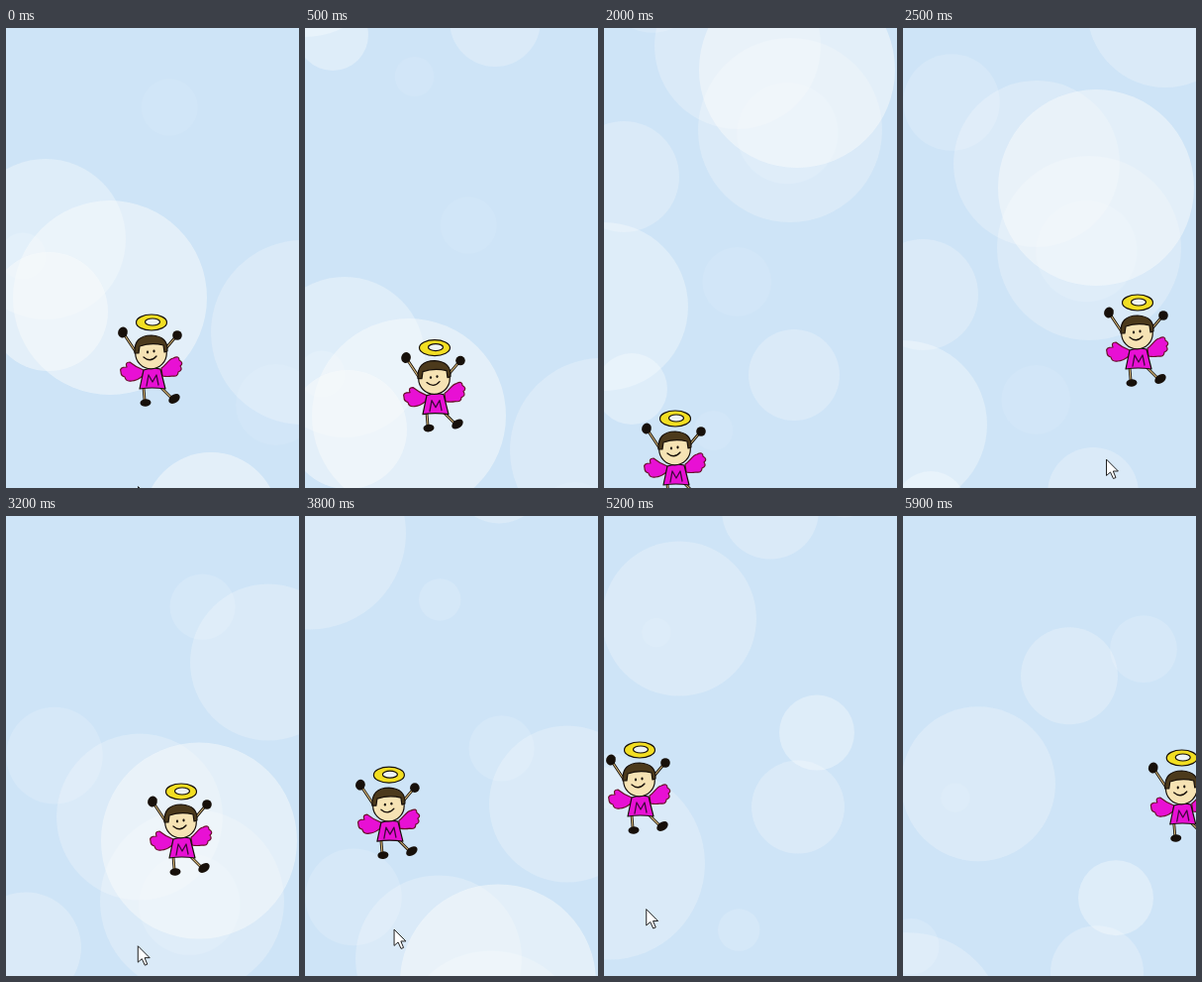
An HTML page with a canvas that plays this animation: 296x464 px, repeating every 6 s.

```html
<!DOCTYPE html>
<html lang="en">
<head>
<meta charset="utf-8">
<title>Flying angel</title>
<style>
  html, body { margin: 0; width: 100%; height: 100%; overflow: hidden; background: #cee4f7; }
  canvas { display: block; }
</style>
</head>
<body>
<canvas id="stage" width="296" height="464"></canvas>
<script>
const ctx = document.getElementById('stage').getContext('2d');
const LOOP = 6000, STEP = 100, SCROLL = 0.238, LEAD = 100;
const INK = '#17100a', PINK = '#e810d4', SKIN = '#f6e3b4', HAIR = '#4c3a1c';

const random = n => Math.abs(Math.sin(n * 12.9898) * 43758.5453) % 1;

// Faint bubbles are scattered evenly up the sky, the large ones placed as x, y, radius
const faint = Array.from({ length: 12 }, (_, i) => ({
  x: 296 * random(i + 1), y: 380 - 150 * i, r: 12 + 40 * random(i + 31), alpha: .06 + .12 * random(i + 61)
}));
const layer = (alpha, ...places) => places.map(([x, y, r]) => ({ x, y, r, alpha }));
const bubbles = [
  ...faint,
  ...layer(.26, [300, 307, 93], [192, -126, 46], [188, -373, 93], [135, -458, 84], [20, -326, 56],
    [265, -614, 79], [5, -887, 97], [196, -944, 47], [76, -1134, 78], [168, -1243, 49]),
  ...layer(.36, [40, 213, 81], [0, -195, 85], [28, -112, 36], [215, -1019, 38]),
  ...layer(.5, [105, 272, 98], [43, 286, 60], [207, 496, 68], [195, -434, 99])
];

// Turning points of the flight: time, x, y
const flight = [
  [0, 147, 297], [400, 125, 325], [1100, 167, 308], [2000, 72, 394], [2500, 237, 277], [2700, 190, 276],
  [3200, 177, 278], [3550, 52, 268], [4500, 177, 242], [5200, 36, 236], [5600, 95, 244], [6000, 344, 244]
];

function flightAt(t) {
  const next = Math.max(1, flight.findIndex(([time]) => time >= t));
  const [t0, x0, y0] = flight[next - 1], [t1, x1, y1] = flight[next];
  const u = (t - t0) / (t1 - t0);
  return [x0 + (x1 - x0) * u, y0 + (y1 - y0) * u];
}

function paint(path, fill, stroke, width = 1.2) {
  if (fill) { ctx.fillStyle = fill; ctx.fill(path, 'evenodd'); }
  if (stroke) { ctx.strokeStyle = stroke; ctx.lineWidth = width; ctx.stroke(path); }
}

function oval(x, y, rx, ry = rx, turn = 0) {
  const path = new Path2D();
  path.ellipse(x, y, rx, ry, turn, 0, 2 * Math.PI);
  return path;
}

function limb(d) {
  paint(new Path2D(d), null, INK, 2.8);
  paint(new Path2D(d), null, '#d8b878', 1.1);
}

const shapes = {
  leftWing: new Path2D('M-8 48Q-16 45-22 40Q-27 40-25 45Q-33 45-31 50Q-31 54-27 55Q-26 60-20 59Q-15 59-9 54Z'),
  rightWing: new Path2D('M10 46C15 43 17 37 22 36Q28 33 28 38Q33 41 29 44Q32 48 27 50Q27 55 21 54Q16 55 11 54Z'),
  dress: new Path2D('M-8 48Q0 45 9 47L14 67Q0 65-12 67Z'),
  letter: new Path2D('M-5 64L-3 53L1 60L5 53L7 63'),
  hair: new Path2D('M-17 31Q-18 13 0 13Q17 14 16 29L13 30L12 23Q0 20-12 24L-13 31Z'),
  smile: new Path2D('M-8 35Q-1 41 5 34'),
  cursor: new Path2D('M0 0V16L4 12.5L7 19L9.5 18L6.8 11.5H11.5Z')
};

function drawAngel() {
  const hole = oval(1, -.5, 7.5, 3.5);
  const halo = oval(0, 0, 15.5, 8);
  halo.addPath(hole);
  paint(hole, '#eef4f4');
  paint(halo, '#f2de22', INK);
  limb('M-27 13L-15 31');
  limb('M24 15L13 28');
  limb('M-8 66L-7 78');
  limb('M10 66L20 76');
  paint(oval(-29, 10, 4.8, 5.5, .3), INK);
  paint(oval(26, 13, 4.8), INK);
  paint(oval(-6, 81, 5.5, 3.8, -.1), INK);
  paint(oval(23, 77, 6.3, 4.2, -.6), INK);
  paint(shapes.leftWing, PINK, '#681028');
  paint(shapes.rightWing, PINK, '#681028');
  paint(shapes.dress, PINK, INK);
  paint(shapes.letter, null, '#40083c', 1.3);
  paint(oval(-.5, 31, 15.8), SKIN, INK);
  paint(shapes.hair, HAIR, INK);
  paint(oval(-4, 30, 1.1, 1.4), INK);
  paint(oval(2.5, 29, 1.1, 1.4), INK);
  paint(shapes.smile, null, INK, 1.3);
}

function drawAt(x, y, draw) {
  ctx.save();
  ctx.translate(x, y);
  draw();
  ctx.restore();
}

function render(t) {
  ctx.fillStyle = '#cee4f7';
  ctx.fillRect(0, 0, 296, 464);
  for (const { x, y, r, alpha } of bubbles) {
    paint(oval(x, y + SCROLL * t, r), `rgba(250,252,252,${alpha})`);
  }
  drawAt(...flightAt(t), drawAngel);
  // The angel trails the pointer
  const [x, y] = flightAt(t + LEAD);
  drawAt(x - 8, y + 159, () => paint(shapes.cursor, '#fff', '#222', 1));
}

ctx.lineJoin = ctx.lineCap = 'round';
const start = performance.now();
function tick() {
  const t = (performance.now() - start) % LOOP;
  render(Math.floor(t / STEP) * STEP);
  requestAnimationFrame(tick);
}
tick();
</script>
</body>
</html>
```
